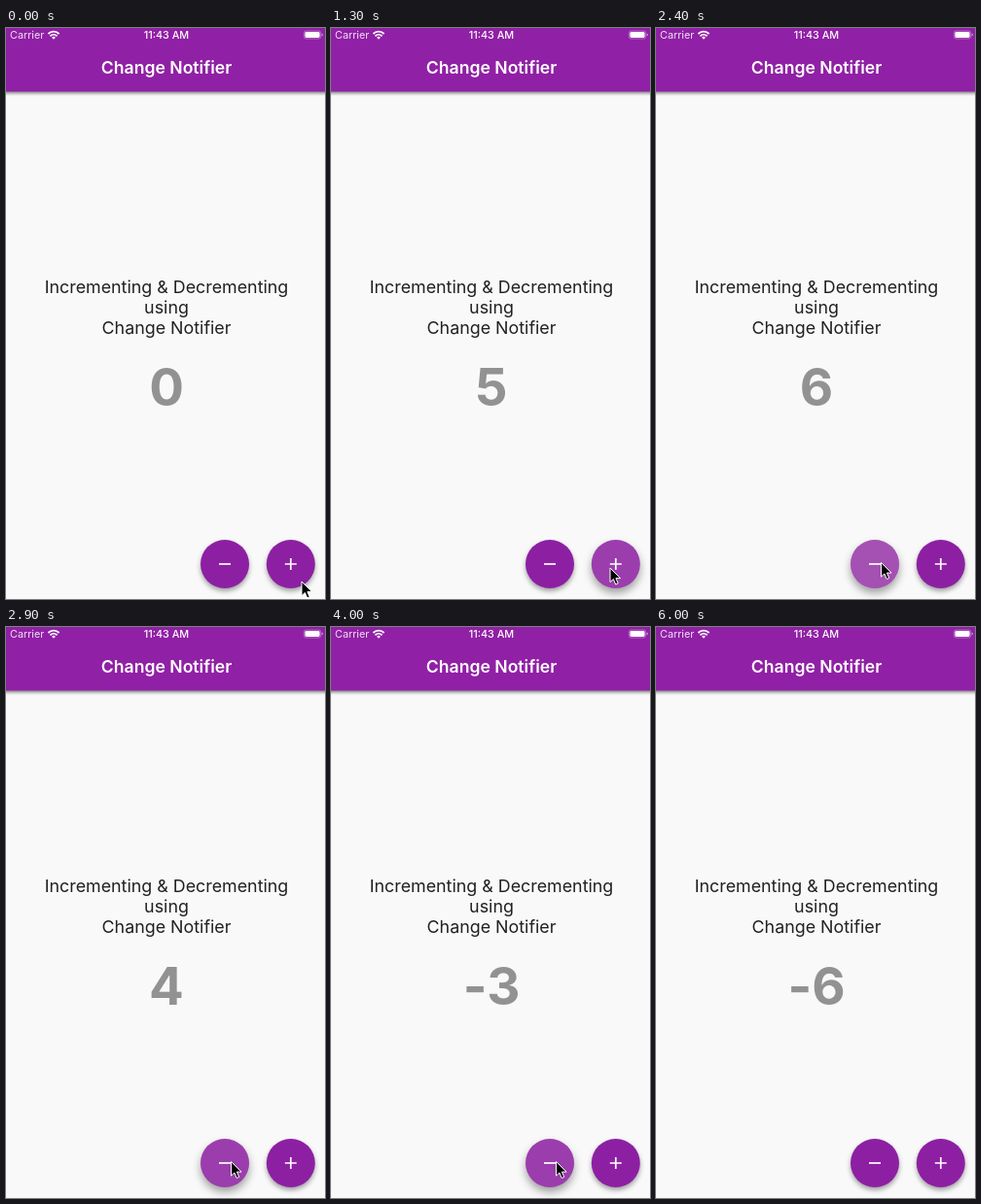
An HTML page for the animation above (6.9 s loop, 328x588 px).

```html
<!DOCTYPE html>
<html lang="en">
<head>
<meta charset="utf-8">
<title>Counter</title>
<style>
  html, body { margin: 0; width: 100%; height: 100%; overflow: hidden; background: #f9f9f9; }
  svg { display: block; width: 100%; height: 100%; }
  text { font-family: Inter, Roboto, sans-serif; text-anchor: middle; }
  .bar { fill: #9020a5; filter: drop-shadow(0 2px 1.6px rgba(0, 0, 0, .45)); }
  .status { fill: #fff; font-size: 10.8px; }
  .title { fill: #fff; font-size: 17.6px; font-weight: 600; }
  .body { fill: #212121; font-size: 17.85px; }
  #count { fill: #929292; font-size: 53px; font-weight: 700; font-feature-settings: "calt" 0; }
  .fab { --press: 0; }
  .disc {
    fill: #8d1fa3;
    filter: drop-shadow(0 calc(3px + 2px * var(--press)) calc(2.5px + 1.5px * var(--press)) rgba(0, 0, 0, .36));
  }
  .glow { fill: #f0f0e8; opacity: 0; }
  .icon { fill: none; stroke: #fff; stroke-width: 1.7; }
</style>
</head>
<body>
<svg viewBox="0 0 328 588">
  <rect class="bar" x="-8" y="-8" width="344" height="73.5"/>
  <text class="status" x="4" y="11" style="text-anchor:start" opacity=".85">Carrier</text>
  <text class="status" x="165" y="11" font-weight="500">11:43 AM</text>
  <g fill="none" stroke="#fff" stroke-width="1.8">
    <path d="M43.4 6a8 8 0 0 1 11.2 0M45.4 8.3a5.2 5.2 0 0 1 7.2 0"/>
    <path d="M49 11.8l-1.9-2a2.7 2.7 0 0 1 3.8 0z" fill="#fff" stroke="none"/>
  </g>
  <rect x="306.3" y="3" width="17.4" height="8" rx="2.2" fill="none" stroke="#fff" stroke-width=".7" opacity=".45"/>
  <rect x="307.4" y="4.1" width="15.2" height="5.8" rx="1.3" fill="#fff"/>
  <path d="M324.6 5.6v2.8q1.3-.4 1.3-1.4t-1.3-1.4" fill="#d6acdd"/>
  <text class="title" x="165" y="47">Change Notifier</text>

  <text class="body" x="165" y="272.5">Incrementing &amp; Decrementing</text>
  <text class="body" x="165" y="293.8">using</text>
  <text class="body" x="165" y="315.2">Change Notifier</text>
  <text id="count" x="165" y="389">0</text>

  <g id="minus" class="fab" transform="translate(225 552)">
    <circle class="disc" r="25"/>
    <circle class="glow" r="25"/>
    <path class="icon" d="M-6 0H6"/>
  </g>
  <g id="plus" class="fab" transform="translate(292.8 552)">
    <circle class="disc" r="25"/>
    <circle class="glow" r="25"/>
    <path class="icon" d="M-6 0H6M0-6V6"/>
  </g>
  <path id="cursor" d="M0 0V14.6L3.4 11.5L5.7 17L8.2 15.9L5.9 10.6H10.6Z"
        fill="#000" stroke="#fff" stroke-width="1" stroke-linejoin="round"/>
</svg>
<script>
const LOOP = 6900, STEP = 100, CLICK_GAP = 172, TRAVEL = 300, CURSOR_GONE = 6000;
const byId = id => document.getElementById(id);
const count = byId('count'), cursor = byId('cursor');

const plus = { element: byId('plus'), change: 1, spot: { x: 287, y: 556 } };
const minus = { element: byId('minus'), change: -1, spot: { x: 231.5, y: 550.5 } };
const home = { x: 304, y: 570 }, rest = { x: 299, y: 556 };

const run = (button, start, clicks) =>
  ({ button, start, clicks, end: start + (clicks - 1) * CLICK_GAP });
const runs = [run(plus, 600, 8), run(minus, 2223, 15), run(plus, 5200, 1)];

const clamp = (v, max = 1) => Math.max(0, Math.min(max, v));
const ease = v => { const u = clamp(v); return u * u * (3 - 2 * u); };

const clicksDone = (r, t) => clamp(Math.floor((t - r.start) / CLICK_GAP) + 1, r.clicks);
const pressure = (r, t) => ease((t - r.start + 150) / 300) * (1 - ease((t - r.end) / 120));
// The first touch flares up before the glow settles.
const flare = (r, t) => .1 * clamp(1 - Math.abs(t - r.start - 150) / 300);

// The pointer leaves each spot right after the last click there.
function cursorAt(t) {
  let { x, y } = home, leave = 0;
  const glide = to => {
    const k = ease((t - leave) / TRAVEL);
    x += (to.x - x) * k;
    y += (to.y - y) * k;
  };
  for (const r of runs) {
    glide(r.button.spot);
    leave = r.end;
  }
  glide(rest);
  return `translate(${x} ${y})`;
}

function draw(now) {
  const t = Math.floor(now % LOOP / STEP) * STEP;
  count.textContent = runs.reduce((sum, r) => sum + r.button.change * clicksDone(r, t), 0);
  for (const button of [plus, minus]) {
    let press = 0, glow = 0;
    for (const r of runs.filter(r => r.button === button)) {
      press += pressure(r, t);
      glow += pressure(r, t) * (.14 + flare(r, t));
    }
    button.element.style.setProperty('--press', press);
    button.element.querySelector('.glow').style.opacity = glow;
  }
  cursor.setAttribute('transform', cursorAt(t));
  cursor.setAttribute('visibility', t < CURSOR_GONE ? 'visible' : 'hidden');
}

let startTime;
function tick(now) {
  startTime ??= now;
  draw(now - startTime);
  requestAnimationFrame(tick);
}
draw(0);
requestAnimationFrame(tick);
</script>
</body>
</html>
```
